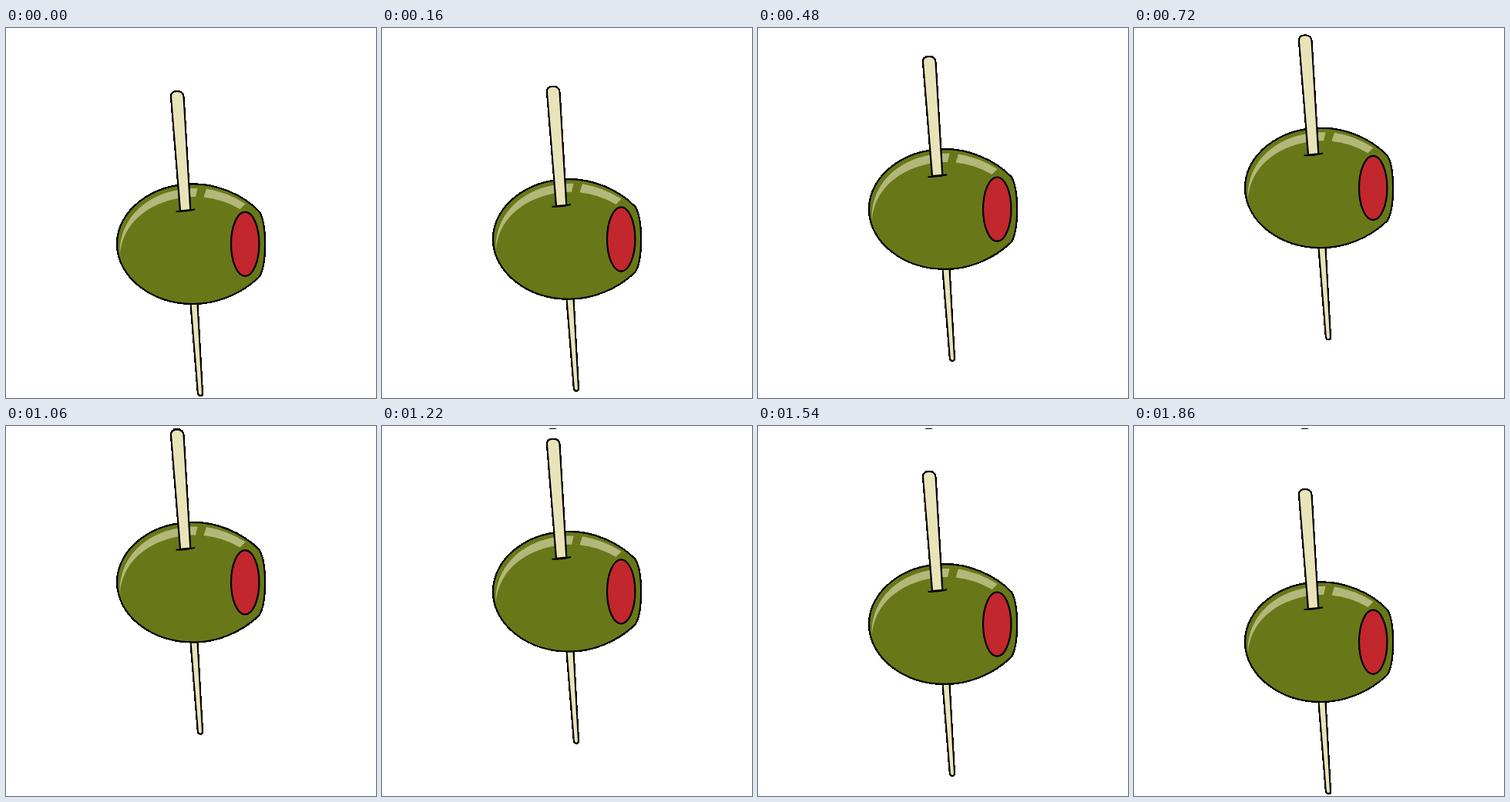
An HTML page with a canvas for the animation above (1.94 s loop, 480 by 480 pixels).

```html
<!DOCTYPE html>
<html lang="en">
<head>
<meta charset="utf-8">
<title>Olive on a pick</title>
<style>
  html, body { margin: 0; width: 100%; height: 100%; overflow: hidden; background: #fff; }
  canvas { display: block; width: 480px; height: 480px; }
</style>
</head>
<body>
<canvas id="stage" width="480" height="480"></canvas>
<script>
const SIZE = 480;
const LOOP = 1940, STEP = 80, RISE = 880, HOLD_END = 1060, LIFT = 79;
const COLORS = { olive: '#687818', shine: '#b3b77a', red: '#c1272d', wood: '#e9e3b9', ink: '#000' };

const ctx = document.getElementById('stage').getContext('2d');
const layer = document.createElement('canvas');
layer.width = layer.height = SIZE;
const g = layer.getContext('2d', { willReadFrequently: true });

const paths = {
  lowerPick: new Path2D('M239 352 L248.8 473.5 Q249.4 477.2 252.2 477.2 Q255.2 477 255 473.5 L248.2 352 Z'),
  olive: new Path2D('M243 202.3 C273 202.3 306 215 328.5 238 C338.6 254 338.6 307 328.5 323 C304 346.5 272 358 243 358 C188.3 358 144 323 144 280 C144 237.2 188.3 202.3 243 202.3 Z'),
  shineLeft: new Path2D('M148 295 C145 246 187 207 248.5 208 L246 219 C195 219 151 248 148 295 Z'),
  shineRight: new Path2D('M260 208.5 Q287 213 310.5 228 L303.5 235 Q281 222 256.5 219.5 Z'),
  pimento: new Path2D(),
  upperPick: new Path2D('M226 237.3 L214 90 Q213.2 82 222 82 Q230.3 82 230.6 90 L239.3 236 Z'),
  slit: new Path2D('M220.5 238 Q233 238.6 245 235.3')
};
paths.pimento.ellipse(310.2, 280.2, 18.2, 41.6, 0, 0, Math.PI * 2);

function shape(path, fill, width) {
  if (fill) {
    g.fillStyle = fill;
    g.fill(path);
  }
  if (width) {
    g.lineWidth = width;
    g.stroke(path);
  }
}

// Make the silhouette hard-edged while inner lines stay smooth.
function hardenEdges() {
  const image = g.getImageData(0, 0, SIZE, SIZE);
  const px = image.data;
  for (let i = 3; i < px.length; i += 4) px[i] = px[i] > 127 ? 255 : 0;
  g.putImageData(image, 0, 0);
}

function drawOlive(lift) {
  g.clearRect(0, 0, SIZE, SIZE);
  g.save();
  g.translate(0, -lift);
  g.strokeStyle = COLORS.ink;
  g.lineJoin = 'round';
  shape(paths.lowerPick, COLORS.wood, 2.2);
  shape(paths.olive, COLORS.olive, 2.2);
  shape(paths.shineLeft, COLORS.shine);
  shape(paths.shineRight, COLORS.shine);
  shape(paths.pimento, COLORS.red, 2.2);
  shape(paths.upperPick, COLORS.wood, 2.2);
  shape(paths.slit, null, 2);
  g.restore();
  hardenEdges();
}

const ease = p => (1 - Math.cos(Math.PI * p)) / 2;

// Rise, pause at the top, then fall, in steps of 80 ms.
function liftAt(t) {
  if (t < HOLD_END) return LIFT * ease(Math.min(RISE, Math.floor(t / STEP) * STEP) / RISE);
  const fallen = (Math.floor((t - HOLD_END) / STEP) + 1) * STEP;
  return LIFT * (1 - ease(fallen / RISE));
}

let shown = '';
function render(now) {
  const t = now % LOOP;
  const lift = liftAt(t);
  const trace = t >= HOLD_END;
  const key = lift + '|' + trace;
  if (key !== shown) {
    shown = key;
    ctx.fillStyle = '#fff';
    ctx.fillRect(0, 0, SIZE, SIZE);
    drawOlive(lift);
    ctx.drawImage(layer, 0, 0);
    if (trace) {
      ctx.fillStyle = COLORS.ink;
      ctx.fillRect(217, 3, 9, 1);
    }
  }
}

const start = performance.now();
function tick() {
  render(performance.now() - start);
  requestAnimationFrame(tick);
}
tick();
</script>
</body>
</html>
```
